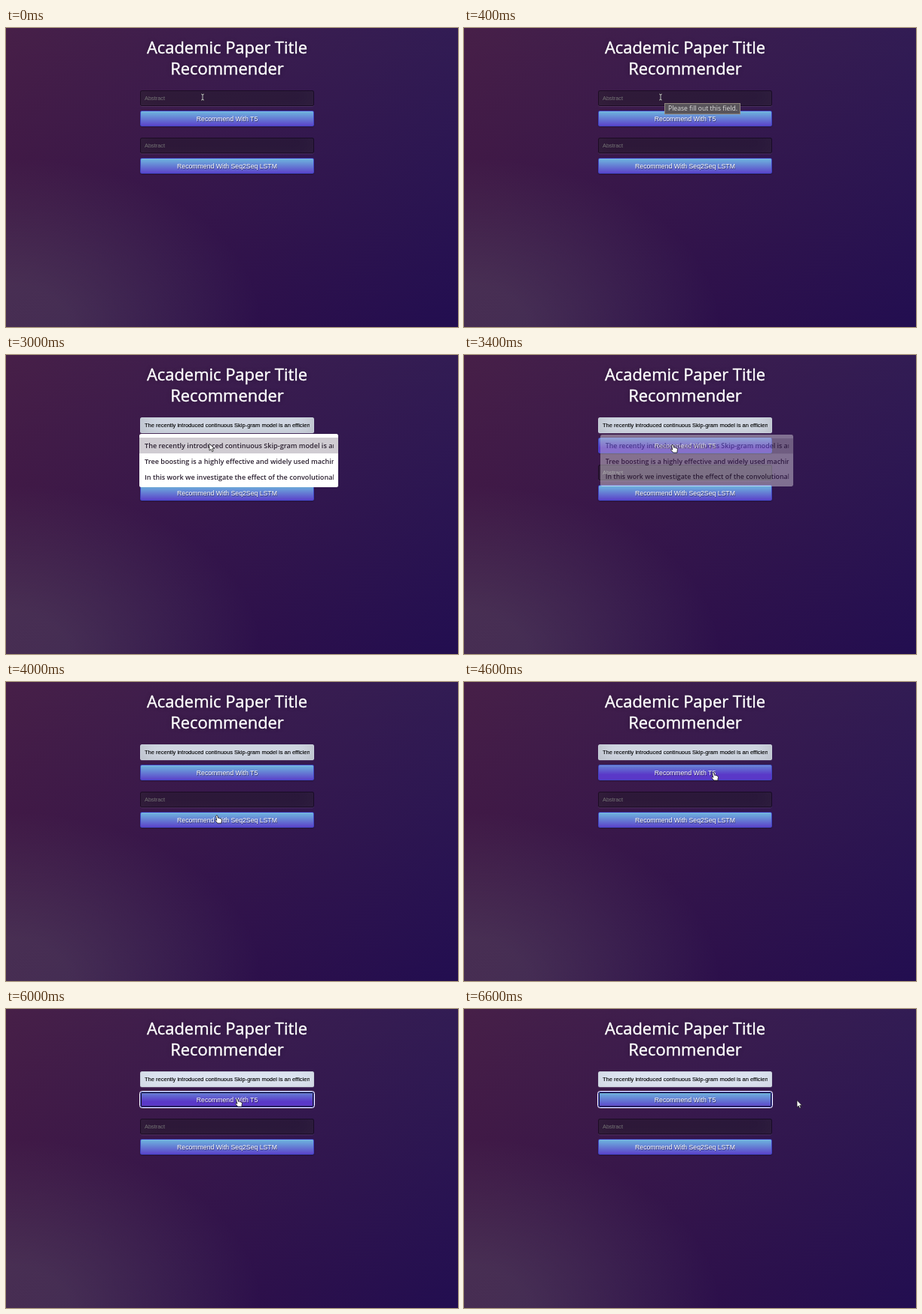
Write an HTML page that moves like this. It is 600x398 px and loops after 8 s.

```html
<!DOCTYPE html>
<html lang="en">
<head>
<meta charset="utf-8">
<title>Title recommender</title>
<style>
html, body { margin: 0; width: 100%; height: 100%; overflow: hidden; }
body {
  position: relative;
  background:
    radial-gradient(ellipse farthest-corner at 0 100%, rgba(110,120,122,.27) 10%, rgba(138,114,76,0) 40%),
    linear-gradient(rgba(57,173,219,.085), rgba(42,60,87,.04)),
    linear-gradient(135deg, #48123a, #220c50);
}
body > * { position: absolute; box-sizing: border-box; margin: 0; white-space: nowrap; }
h1 {
  left: 93.5px; top: 11.8px; width: 400px; text-align: center;
  font: 400 21.9px/28.4px "Open Sans", sans-serif;
  color: #fff; -webkit-text-stroke: .4px #fff; text-shadow: 0 0 6px rgba(0,0,0,.3);
}
.field, .btn { left: 178px; width: 231px; height: 21px; border-radius: 2.5px; font-family: "Liberation Sans", Arial, sans-serif; }
.field {
  --focus: 0;
  padding: 0 5px; border: 1px solid rgba(0,0,0,.3);
  background: rgba(0,0,0,.3); color: #757575; font-size: 7.4px; line-height: 20px;
  box-shadow: inset 0 -3px 26px rgba(100,100,100,calc(.2 + .2 * var(--focus))), 0 .6px .6px rgba(255,255,255,.2);
}
.field span { display: block; overflow: hidden; }
.field.full { border-color: rgba(0,0,0,.14); background: #e8f0fe; color: #000; font-size: 7.52px; -webkit-text-stroke: .12px #000; }
.btn {
  border: .6px solid rgba(55,70,188,.7);
  background: #5a38c8 linear-gradient(#6eb6de, #5a38c8) 0 0 / 100% 21px no-repeat;
  color: #fff; font-size: 8.7px; line-height: 20px; text-align: center;
  text-shadow: .6px .6px .6px rgba(0,0,0,.5);
  box-shadow: inset 0 .6px 0 rgba(255,255,255,.2), 0 .6px 1.2px rgba(0,0,0,.5);
}
.btn.hover { background-position: 0 -8.7px; }
.btn.focus { outline: 1px solid #fff; box-shadow: inset 0 0 0 1px #16101f; }
#caret { left: 184px; top: 88px; width: 1px; height: 10px; background: #ddd; }
#tip {
  left: 266px; top: 100px; width: 101px; height: 15px; padding-left: 4px;
  border: 1px solid #91877f; background: #58545a; color: #dcdcdc;
  font: 8.6px/13px "Open Sans", sans-serif;
}
#menu {
  left: 177px; top: 105px; width: 264px; height: 71px; padding-top: 5px;
  border-radius: 2.5px; background: #fff; box-shadow: 0 0 1px rgba(0,0,0,.4);
  color: #2b2030; font: 600 9.1px/21px "Open Sans", sans-serif;
}
#menu div { padding: 0 6.5px 0 7px; height: 21px; }
#menu span { display: block; overflow: hidden; }
#menu.hover div:first-child { background: #d0ccd2; }
#menu.fading { opacity: .38; transform: scale(.97); }
#pointer { left: 0; top: 0; width: 14px; height: 16px; overflow: visible; }
</style>
</head>
<body>
<h1>Academic Paper Title<br>Recommender</h1>
<div class="field" id="field1" style="top:83px"><span></span></div>
<div class="btn" id="btn1" style="top:110px">Recommend With T5</div>
<div class="field" style="top:145.5px"><span>Abstract</span></div>
<div class="btn" id="btn2" style="top:172.5px">Recommend With Seq2Seq LSTM</div>
<div id="caret"></div>
<div id="menu">
  <div><span>The recently introduced continuous Skip-gram model is an efficient method</span></div>
  <div><span>Tree boosting is a highly effective and widely used machine learning method</span></div>
  <div><span>In this work we investigate the effect of the convolutional network depth</span></div>
</div>
<div id="tip">Please fill out this field.</div>
<svg id="pointer">
  <g id="beam" fill="none" stroke-linecap="round">
    <path d="M-1.5-4Q0-4 0-3V3Q0 4-1.5 4M1.5-4Q0-4 0-3M0 3Q0 4 1.5 4" stroke="#1a1022" stroke-width="2"/>
    <path d="M-1.5-4Q0-4 0-3V3Q0 4-1.5 4M1.5-4Q0-4 0-3M0 3Q0 4 1.5 4" stroke="#ddd" stroke-width=".9"/>
  </g>
  <path id="hand" d="M2 .8Q3.2 0 3.8 1.2L4.5 4.2Q6 3.6 6.4 4.6Q7.8 4.2 8 5.2Q9.4 5 9.5 6.4L9 9.4V11H3.8L.8 7.6Q.3 6.4 1.6 6.5L2.8 7.2L1.6 1.8Q1.5 1.1 2 .8Z" fill="#fff" stroke="#111" stroke-width=".8"/>
  <path id="arrow" d="M0 0V9.2L2.1 7.3L3.6 10.7L5.2 10L3.7 6.7H6.6Z" fill="#fff" stroke="#111" stroke-width=".7"/>
</svg>
<script>
const LOOP = 8000, STEP = 200;
// start time, x, y, pointer shape
const path = [
  [0, 261, 92, 'beam'], [2400, 268, 109, 'arrow'], [2600, 316, 131, 'arrow'],
  [3000, 270, 118, 'arrow'], [3200, 274, 119, 'arrow'], [3400, 274, 119, 'hand'],
  [3800, 280, 151, 'beam'], [4000, 277, 177, 'hand'], [4200, 280, 150, 'beam'],
  [4400, 328, 120, 'hand'], [4800, 253, 118, 'hand'], [6000, 304, 119, 'hand'],
  [6200, 398, 120, 'hand'], [6400, 439, 120, 'arrow'], [6600, 442, 121.5, 'arrow']
];
const $ = id => document.getElementById(id);
const clamp = v => Math.max(0, Math.min(1, v));
const show = (id, on) => { $(id).style.display = on ? '' : 'none'; };
const flag = (id, name, on) => $(id).classList.toggle(name, on);

function draw(time) {
  const t = Math.floor(time % LOOP / STEP) * STEP;
  const within = (a, b) => t >= a && t < b;
  const [, x, y, shape] = path.findLast(p => p[0] <= t);

  $('pointer').style.transform = `translate(${x}px, ${y}px)`;
  for (const id of ['beam', 'hand', 'arrow']) show(id, id === shape);

  const full = t >= 2600;
  flag('field1', 'full', full);
  $('field1').firstChild.textContent = full
    ? 'The recently introduced continuous Skip-gram model is an efficient method' : 'Abstract';
  $('field1').style.setProperty('--focus', clamp((t - 2100) / 400) - clamp((t - 5400) / 500));

  show('tip', within(400, 2200));
  show('caret', within(2200, 2600));
  show('menu', within(2200, 3600));
  flag('menu', 'hover', full);
  flag('menu', 'fading', t >= 3400);
  flag('btn1', 'hover', within(3400, 3800) || within(4400, 6400));
  flag('btn1', 'focus', t >= 5400);
  flag('btn2', 'hover', within(4200, 4400));
}

const start = performance.now();
function tick() {
  draw(performance.now() - start);
  requestAnimationFrame(tick);
}
tick();
</script>
</body>
</html>
```
